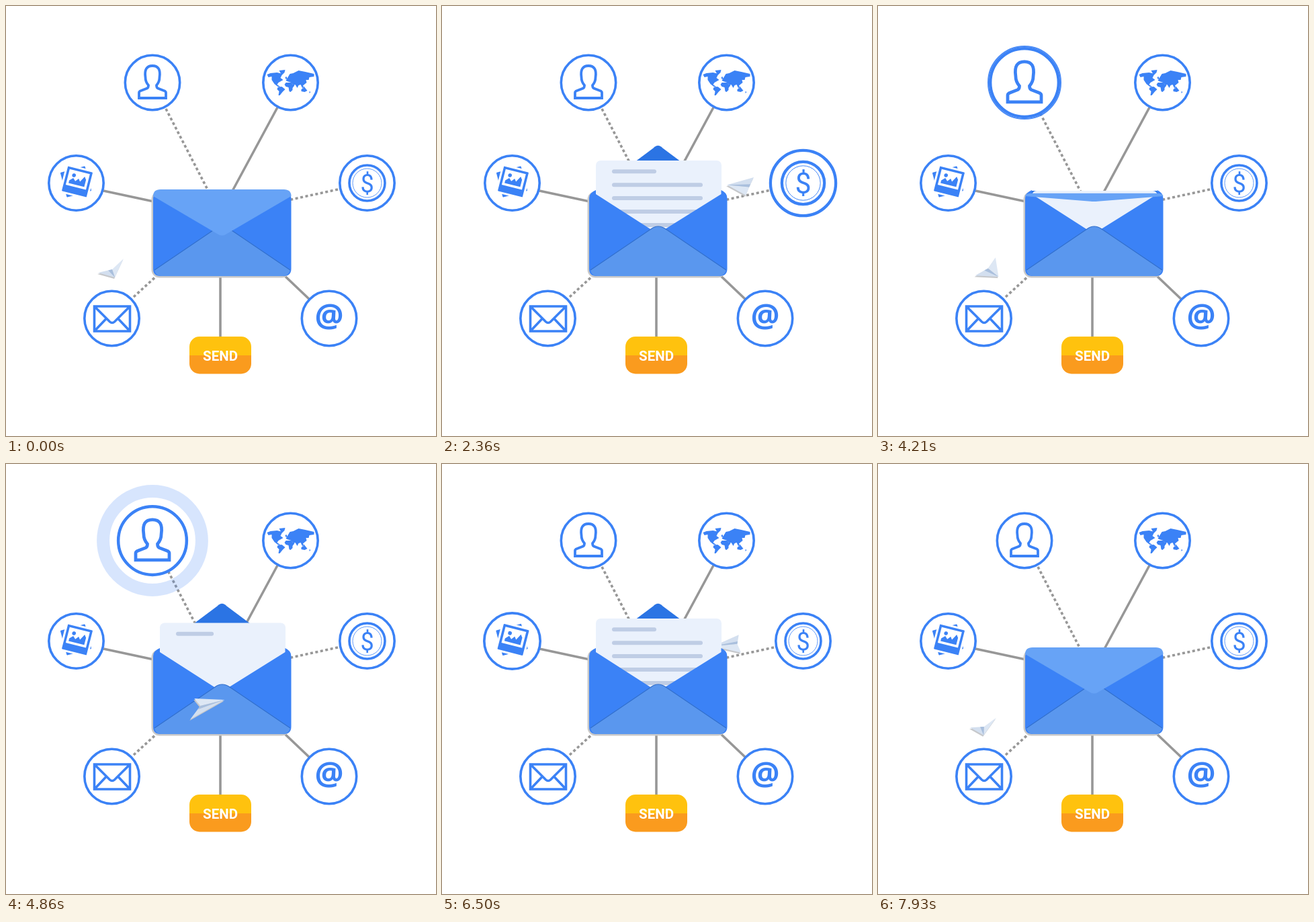
Recreate the animation shown at these times as an HTML page with a canvas. Size 640 px wide and 640 px high, loop 8000 ms.

```html
<!DOCTYPE html>
<html lang="en">
<head>
<meta charset="utf-8">
<title>Mail network</title>
<style>
html, body { margin: 0; height: 100%; overflow: hidden; background: #fff; }
canvas { display: block; }
</style>
</head>
<body>
<canvas width="640" height="640"></canvas>
<script>
const c = document.querySelector('canvas').getContext('2d');
const BLUE = '#3b82f6', DARK = '#2b74e4', GREY = '#979797';
const LOOP = 8000, HALF = 4000;

const fill = (d, color) => { c.fillStyle = color; c.fill(new Path2D(d)); };
const stroke = (d, color, width) => {
  c.strokeStyle = color; c.lineWidth = width; c.stroke(new Path2D(d));
};
const circle = (x, y, r) => { c.beginPath(); c.arc(x, y, r, 0, 7); };
const box = (x, y, w, h, r, color) => {
  c.beginPath(); c.roundRect(x, y, w, h, r); c.fillStyle = color; c.fill();
};
const text = (s, font, y, color) => {
  c.font = font; c.fillStyle = color; c.textAlign = 'center'; c.fillText(s, 0, y);
};
// progress of t from a to b, eased at both ends
const ease = (t, a, b) => {
  const u = Math.min(1, Math.max(0, (t - a) / (b - a)));
  return u * u * (3 - 2 * u);
};

const LINKS = [
  ['M145 275L222 291.5'], ['M404 151L336 277'], ['M319 398V494'], ['M451 436L411 398'],
  ['M238 153L302 277', 1], ['M494 273L422 288.5', 1], ['M190 433L226 400', 1]
];

function drawLinks() {
  for (const [d, dotted] of LINKS) {
    c.setLineDash(dotted ? [4, 3.6] : []);
    stroke(d, GREY, 3.6);
  }
  c.setLineDash([]);
}

const MAP = 'M-35-12L-30-14-20-15-12-13-15-7-11-4-18 0-20 3-17 5-14 7-19 6-24 2-28-4-28-9-33-8Z' +
  'M-17-18L-8-19-9-15-13-11Z M-19 7L-13 6-8 10-12 14-16 19-18 19-17 13-20 10Z' +
  'M-7 0L1 0 3 3 6 4 3 8 3 11 0 14-2 13-3 7-7 6-9 3Z' +
  'M-5-2L-7-3-4-8-1-13 4-14 12-18 22-16 35-13 35-9 28-8 27-4 23-4 24 0 19 4 18 9 15 3 12 4 10 8 7 3 4 4 1 0Z' +
  'M16 10L21 7 25 12 21 14 16 13Z M16 6L21 6 20 8Z M28 13L30 14 28 16Z M-8-8L-6-9-5-6-7-5Z';
const PERSON = 'M-20 23V15Q-20 13-17 12L-8 8.5Q-6 7.5-6 4Q-10.500-1-10.500-8Q-13-25 0-25' +
  'Q13-25 10.500-8Q10.500-1 6 4Q6 7.500 8 8.500L17 12Q20 13 20 15V23Z';

function drawPhotos() {
  c.save();
  c.translate(-.5, -2); c.rotate(-.26);
  box(-19, -19, 38, 38, 1, BLUE);
  c.restore();
  c.translate(1.5, -2); c.rotate(.25);
  box(-22, -22, 44, 44, 1, '#fff');
  box(-19, -19, 38, 38, 1, BLUE);
  box(-15.5, -15.5, 31, 24, 0, '#fff');
  circle(-7, -8, 2.8); c.fillStyle = BLUE; c.fill();
  fill('M-12 5V1L-7-4-3 0 1-5 4-1 9-10 12-6V5Z', BLUE);
}

// icons in the order they pulse
const ICONS = [
  [481, 465, () => text('@', '700 48px "Open Sans", sans-serif', 14, BLUE)],
  [537.5, 263.5, () => {
    circle(0, 0, 26.5); c.lineWidth = 3.6; c.strokeStyle = BLUE; c.stroke();
    circle(0, 0, 21.5); c.lineWidth = .8; c.stroke();
    text('$', '36px Roboto, sans-serif', 13, BLUE);
  }],
  [423.5, 114, () => fill(MAP, BLUE)],
  [218, 114, () => stroke(PERSON, BLUE, 3.8)],
  [104.5, 263.5, drawPhotos],
  [157.5, 465, () => stroke('M-26-18H27V19H-26ZL-3 5Q.5 8 4 5L27-18M-26 19L-8 0M27 19L9 0', BLUE, 3.6)]
];

function drawIcon([x, y, draw], u) {
  const size = 1 + .25 * (ease(u, -165, 0) - ease(u, 770, 1100));
  c.save();
  c.translate(x, y);
  c.save();
  c.scale(size, size);
  circle(0, 0, 40.7);
  c.fillStyle = '#fff'; c.fill();
  c.strokeStyle = BLUE; c.lineWidth = 3.6; c.stroke();
  draw();
  c.restore();
  const p = u / 770;
  if (p > 0 && p < 1) {
    const width = 24 * p - 4 * p * p;
    circle(0, 0, 52 + 33 * p - width / 2);
    c.globalAlpha = 1 - .85 * p;
    c.strokeStyle = BLUE; c.lineWidth = width; c.stroke();
  }
  c.restore();
}

function drawLetter(t) {
  const top = 275 - 45 * (ease(t, 480, 980) - ease(t, 2815, 3315));
  box(229, top, 187, 338 - top, [7, 7, 0, 0], '#eaf1fc');
  let ink = (t - 800) * .92;
  [66, 135, 135, 135, 135].forEach((len, i) => {
    const w = Math.min(len, ink), y = top + 13.3 + i * 19.9;
    if (w > 0 && y < 332) box(253, y, w, 6, 3, '#bfcde5');
    ink -= len;
  });
}

function drawEnvelope(t) {
  // 1 is shut, -1 is fully open
  const flap = 1 - 2 * (ease(t, 0, 480) - ease(t, 3330, 3880));
  box(216.5, 276, 206, 128.500, 12, '#c9c9c9');
  fill('M220 282L229 275H415L423 282 321 345Z', DARK);
  if (flap <= 0) {
    const tip = 281 + 74.500 * flap, rise = -flap * 5;
    fill(`M220 282L${321.5 - 7} ${tip + rise}Q321.5 ${tip - rise / 2} ${321.5 + 7} ${tip + rise}L423 282Z`, DARK);
  }
  drawLetter(t);
  fill('M219 286Q219 278 229 274V280L321 339 415.500 280V274Q424.500 278 424.500 286V391' +
    'Q424.500 402 413 402H230Q219 402 219 391Z', BLUE);
  fill('M221 393L311 332Q321.500 324 333 332L423 393Q420 402 412 402H231Q223 402 221 393Z', '#5a97ee');
  stroke('M221 393L311 332Q321.500 324 333 332L423 393', '#316fcd', 1.1);
  if (flap > 0) {
    const tip = 280 + 63 * flap, top = 280 - 7 * flap;
    fill(`M219 283Q219 ${top} 230 ${top}H413.5Q424.5 ${top} 424.5 283L327 ${tip - 3 * flap}` +
      `Q321.5 ${tip} 316 ${tip - 3 * flap}Z`, '#67a3f6');
  }
}

// the narrowest bold face, sized to the label
const labelFont = (() => {
  const faces = ['Open Sans', 'Noto Sans', 'Roboto'].map(name => {
    const font = size => `bold extra-condensed ${size}px "${name}", sans-serif`;
    c.font = font(100);
    return { font, width: c.measureText('SEND').width };
  }).sort((a, b) => a.width - b.width);
  const size = Math.min(33, 5200 / faces[0].width);
  return { css: faces[0].font(size), base: size * .357 };
})();

function drawButton(t) {
  c.save();
  c.beginPath(); c.roundRect(273, 492, 92, 55.500, 15); c.clip();
  box(273, 492, 92, 28, 0, '#ffc20e');
  box(273, 520, 92, 28, 0, '#fa9b1e');
  const x = 263 + (t + 2250) % (LOOP / 3) * .313;
  fill(`M${x} 492h-35l-15 56h35Z`, 'rgba(255,255,255,.48)');
  c.translate(319, 520.5);
  text('SEND', labelFont.css, labelFont.base, '#fff');
  c.restore();
}

// plane poses: time, then nose, left wing, right wing and fold
const POSES = [
  [0, 162, 404, 175, 376, 137, 397, 158, 392],
  [400, 206, 396, 187, 371, 165, 399, 182, 385],
  [860, 325, 351, 280, 349, 274, 380, 289, 360],
  [1290, 431, 300, 380, 317, 420, 332, 402, 317],
  [1790, 468, 265, 437, 289, 495, 272, 466, 280],
  [2150, 448, 263, 453, 286, 488, 260, 473, 275],
  [2600, 385, 278, 432, 284, 422, 258, 422, 271],
  [3430, 183, 371, 228, 358, 211, 337, 216, 350],
  [3700, 153, 396, 190, 380, 154, 366, 171, 380]
];
const pose = i => {
  const n = POSES.length, row = POSES[(i + n) % n];
  return [row[0] + HALF * Math.floor(i / n), ...row.slice(1)];
};

function planePoints(t) {
  let i = POSES.length - 1;
  while (POSES[i][0] > t) i--;
  const [a, b, d, e] = [-1, 0, 1, 2].map(k => pose(i + k));
  const span = d[0] - b[0], u = (t - b[0]) / span, v = 1 - u;
  return b.slice(1).map((p, k) => {
    k++;
    const m = (d[k] - a[k]) / (d[0] - a[0]) * span;
    const n = (e[k] - p) / (e[0] - b[0]) * span;
    return p * v * v * (1 + 2 * u) + m * u * v * v + d[k] * u * u * (3 - 2 * u) - n * u * u * v;
  });
}

function drawPlane(t) {
  const [nx, ny, lx, ly, rx, ry, mx, my] = planePoints(t);
  const kx = mx + (rx - mx) * .28, ky = my + (ry - my) * .28;
  c.save();
  c.translate(-1, 2);
  fill(`M${nx} ${ny}L${lx} ${ly} ${mx} ${my} ${rx} ${ry}Z`, '#c6c8cb');
  c.restore();
  fill(`M${nx} ${ny}L${mx} ${my} ${rx} ${ry}Z`, '#d3dfef');
  fill(`M${nx} ${ny}L${lx} ${ly} ${mx} ${my}Z`, '#dde7f4');
  fill(`M${nx} ${ny}L${mx} ${my} ${kx} ${ky}Z`, '#a9bfdd');
}

function frame(now) {
  const t = now % LOOP, h = t % HALF, behind = h > 2000 && h < 3750;
  c.fillStyle = '#fff'; c.fillRect(0, 0, 640, 640);
  drawLinks();
  if (behind) drawPlane(h);
  drawEnvelope(h);
  drawButton(t);
  ICONS.forEach((icon, i) => drawIcon(icon, t - 165 - 1325 * i));
  if (!behind) drawPlane(h);
  requestAnimationFrame(frame);
}
requestAnimationFrame(frame);
</script>
</body>
</html>
```
